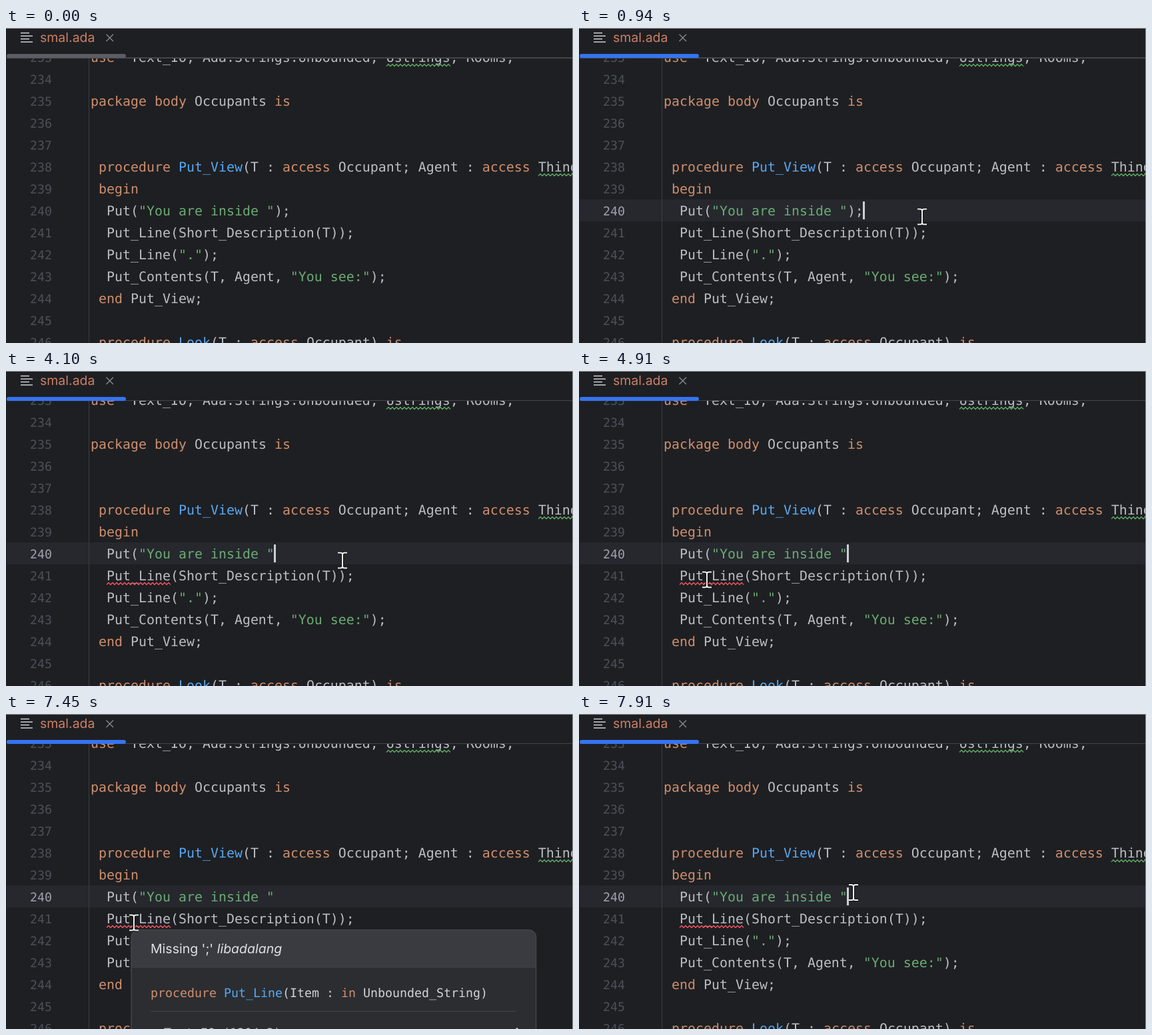
Write an HTML page that moves like this. It is 851 by 474 pixels and loops after 8 s.

```html
<!DOCTYPE html>
<html lang="en">
<head>
<meta charset="utf-8">
<title>Editor</title>
<style>
  html, body { margin: 0; width: 100%; height: 100%; overflow: hidden; background: #1e1f22; }
  svg { display: block; }
  text { white-space: pre; text-rendering: geometricPrecision; fill: #bcbec4; }
  .code { font: 19.93px "DejaVu Sans Mono", monospace; }
  .small { font: 18.27px "DejaVu Sans Mono", monospace; }
  .ui { font: 19.5px Inter, sans-serif; }
  .num { fill: #4b5059; }
  .kw { fill: #cf8e6d; }
  .fn { fill: #56a8f5; }
  .str { fill: #6aab73; }
  .wave { fill: none; stroke-width: 1.3; }
</style>
</head>
<body>
<svg id="stage" width="851" height="474" viewBox="0 0 851 474">
  <rect width="851" height="474" fill="#1e1f22"/>
  <rect id="current" x="1" y="258" width="849" height="33" fill="#26282e"/>
  <rect x="124" y="45" width="1" height="429" fill="#3a3c41"/>
  <g id="rows"></g>
  <path id="error" class="wave" stroke="#f75464"/>
  <rect id="caret" y="261" width="3" height="27" fill="#ced0d6"/>

  <g id="header">
    <rect width="851" height="45" fill="#1e1f22"/>
    <rect x="1" y="44" width="849" height="1" fill="#43454a"/>
    <rect id="edge" x="1" y="45" width="849" height="1" fill="#43454a"/>
    <path d="M22 7.5h13M22 12h18M22 16.5h13M22 21h18" stroke="#ced0d6" stroke-width="1.6"/>
    <text class="ui" x="51" y="21" style="fill:#cb7f65">smal.ada</text>
    <path d="M150.5 9.5l10.5 10.5M161 9.5L150.5 20" stroke="#868a91" stroke-width="1.4"/>
    <rect id="tab" x="1" y="39" width="179" height="6" rx="3"/>
  </g>

  <g id="popup">
    <rect x="188" y="325" width="607.5" height="180" rx="11" fill="#2b2d30"/>
    <path d="M188 382V336a11 11 0 0 1 11-11H784.5a11 11 0 0 1 11 11V382z" fill="#393b40"/>
    <rect x="188" y="325" width="607.5" height="180" rx="11" fill="none" stroke="#43454a" stroke-width="1.5"/>
    <text class="ui" x="217" y="360" style="fill:#dfe1e5">Missing ';' <tspan font-style="italic">libadalang</tspan></text>
    <rect x="217" y="447" width="549" height="1" fill="#43454a"/>
    <text class="small" x="237" y="486">Text_IO (1204:3)</text>
    <circle cx="767" cy="474" r="1.8" fill="#ced0d6"/>
  </g>

  <g id="pointer" fill="none">
    <path id="halo" stroke="#101113" stroke-width="4"/>
    <path id="beam" stroke="#f2f2f2" stroke-width="2"/>
  </g>
  <path d="M0 .5H851M850.5 0V474" stroke="#8f9092"/>
</svg>
<script>
const LOOP = 8000, LEFT = 127, ADVANCE = 12, PITCH = 33;
const $ = id => document.getElementById(id);
const show = (id, on) => $(id).setAttribute("visibility", on ? "visible" : "hidden");
const colX = col => LEFT + col * ADVANCE;
const baseline = line => 282 + (line - 240) * PITCH;

function add(parent, tag, attrs, text = "") {
  const node = document.createElementNS("http://www.w3.org/2000/svg", tag);
  for (const key in attrs) node.setAttribute(key, attrs[key]);
  node.textContent = text;
  return parent.appendChild(node);
}

const TOKENS = /("[^"]*")|\b(use|package|body|procedure|access|begin|end|is|in)\b|((?<=procedure )\w+)/g;

function paint(node, source) {
  node.textContent = "";
  let last = 0;
  const span = (cls, text) => text && add(node, "tspan", { class: cls }, text);
  for (const m of source.matchAll(TOKENS)) {
    span("", source.slice(last, m.index));
    span(m[1] ? "str" : m[2] ? "kw" : "fn", m[0]);
    last = m.index + m[0].length;
  }
  span("", source.slice(last));
}

function wave(line, col, chars) {
  const y = baseline(line) + 6.5;
  return `M${colX(col)} ${y}` + "l3 -3l3 3".repeat(chars * ADVANCE / 6);
}

const SOURCE = [
  "use  Text_IO, Ada.Strings.Unbounded, Ustrings, Rooms;",
  "",
  "package body Occupants is",
  "",
  "",
  " procedure Put_View(T : access Occupant; Agent : access Thing'Class) is",
  " begin",
  "  Put(\"You are inside \");",
  "  Put_Line(Short_Description(T));",
  "  Put_Line(\".\");",
  "  Put_Contents(T, Agent, \"You see:\");",
  " end Put_View;",
  "",
  " procedure Look(T : access Occupant) is"
];
const EDITED = 7;
const rows = SOURCE.map((source, i) => {
  const y = baseline(233 + i);
  const number = add($("rows"), "text", { class: "small num", x: 36, y }, 233 + i);
  const code = add($("rows"), "text", { class: "code", x: LEFT, y });
  paint(code, source);
  return { number, code };
});
for (const d of [wave(233, 37, 8), wave(238, 56, 5)])
  add($("rows"), "path", { class: "wave", stroke: "#5fad65", d });
$("error").setAttribute("d", wave(241, 2, 8));
paint(add($("popup"), "text", { class: "small", x: 217, y: 426, style: "fill:#d0d2d8" }),
  "procedure Put_Line(Item : in Unbounded_String)");

const BEAM = "M-7 -11.5H-3Q0 -11.5 0 -9Q0 -11.5 3 -11.5H7M0 -10V10M-7 11.5H-3Q0 11.5 0 9Q0 11.5 3 11.5H7";
$("halo").setAttribute("d", BEAM);
$("beam").setAttribute("d", BEAM);

// Pointer strokes: start, end, number of steps, way points.
const MOVES = [
  [130, 870, 12, [[701, 447], [645, 400], [565, 330], [502, 279], [514, 285], [522, 289]]],
  [940, 940, 1, [[515, 284]]],
  [4100, 4450, 6, [[505, 285], [400, 286], [270, 291], [204, 296]]],
  [4590, 4910, 5, [[202, 299], [197, 306], [192, 314]]],
  [7520, 7910, 6, [[205, 311], [300, 292], [385, 274], [412, 268.5]]]
];
// Caret: time, column (-1 is off).
const CARET = [[0, -1], [940, 25], [1740, 24], [1940, 23], [3430, -1], [3900, 23], [4380, -1], [4910, 23],
  [5440, -1], [5910, 23], [6440, -1], [6910, 23], [7450, -1], [7910, 23]];

const latest = (table, t) => table.filter(entry => entry[0] <= t).pop();

function pointerAt(t) {
  const move = latest(MOVES, t);
  if (!move || (t >= 1670 && t < 4100)) return null;
  const [start, end, steps, points] = move;
  if (steps === 1) return points[0];
  const step = Math.min(steps - 1, Math.floor((t - start) / (end - start) * (steps - 1) + 1e-6));
  const pos = step / (steps - 1) * (points.length - 1);
  const i = Math.min(points.length - 2, Math.floor(pos));
  return points[i].map((v, axis) => v + (points[i + 1][axis] - v) * (pos - i));
}

let shownText = "";
function draw(t) {
  const active = t >= 940;
  show("current", active);
  show("edge", t < 2340);
  show("error", t >= 2610);
  show("popup", t >= 5370 && t < 7730);
  $("tab").setAttribute("fill", active ? "#3574f0" : "#5a5d63");
  rows[EDITED].number.style.fill = active ? "#a1a3ab" : "";

  const length = t < 1740 ? 25 : t < 1940 ? 24 : 23;
  const text = SOURCE[EDITED].slice(0, length);
  if (text !== shownText) paint(rows[EDITED].code, shownText = text);

  const col = latest(CARET, t)[1];
  show("caret", col >= 0);
  $("caret").setAttribute("x", colX(col) - 1);

  const pos = pointerAt(t);
  show("pointer", pos);
  if (pos) $("pointer").setAttribute("transform", `translate(${pos})`);
}

const began = performance.now();
function tick() {
  draw((performance.now() - began) % LOOP);
  requestAnimationFrame(tick);
}
tick();
</script>
</body>
</html>
```
